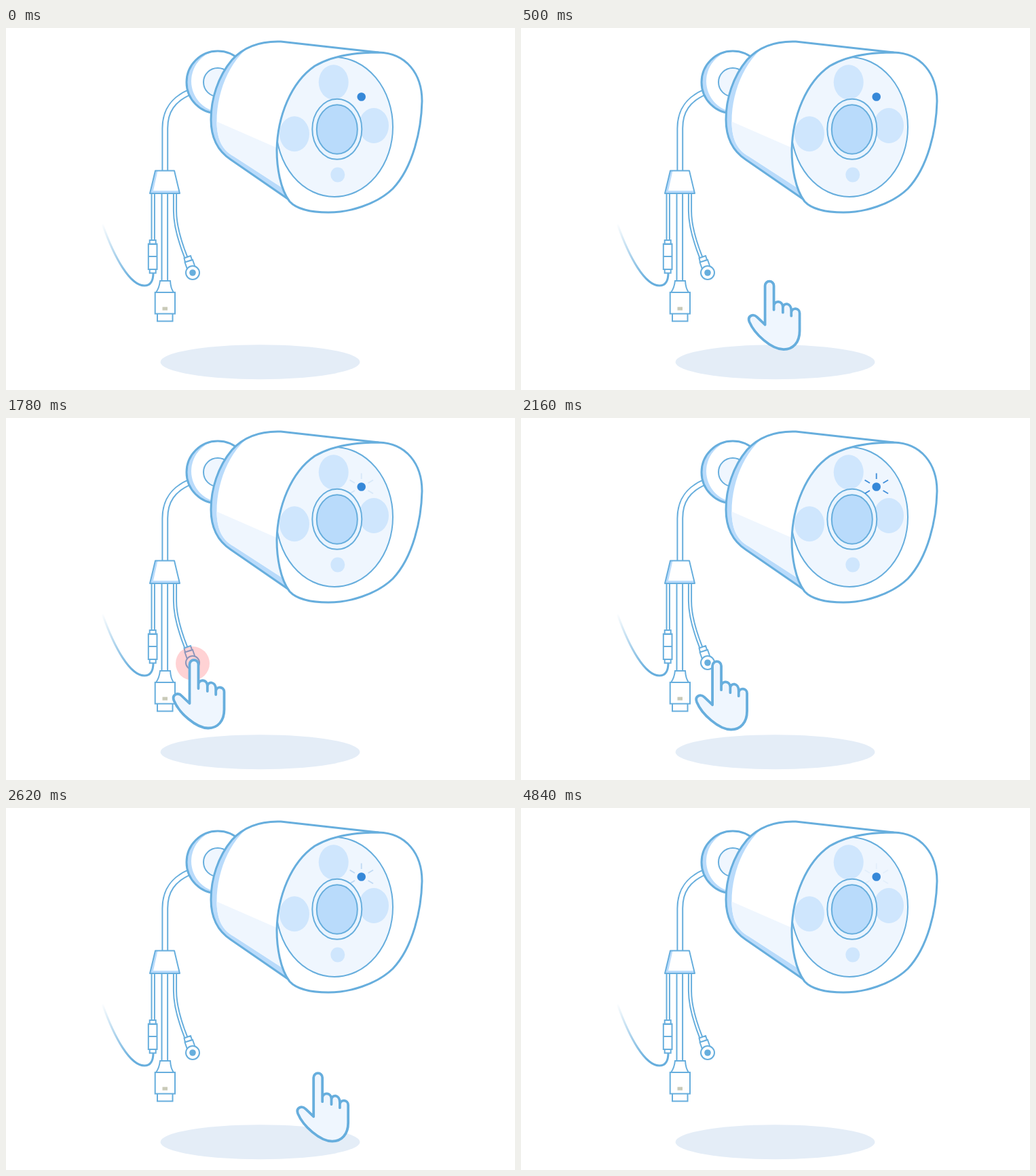
Write an HTML page that moves like this. It is 750 by 534 pixels and loops after 4900 ms.

```html
<!DOCTYPE html>
<html lang="en">
<head>
<meta charset="utf-8">
<title>Camera reset</title>
<style>
  html, body { margin: 0; width: 100%; height: 100%; overflow: hidden; background: #fff; }
  svg { display: block; width: 100%; height: 100%; }
  .line { stroke: #67aedd; stroke-width: 2; fill: #fff; }
  .bold { stroke-width: 3; }
  .none { fill: none; }
  .pale { fill: #eff6fe; }
  .soft { fill: #cfe6fd; }
  .deep { fill: #b9dbfb; }
  .core { stroke: #fff; fill: none; }
</style>
</head>
<body>
<svg viewBox="0 0 750 534">
  <defs>
    <path id="hood" d="M549 36C590 37 613 68 613 108C612 150 600 205 570 237C545 261 505 272 475 272C450 272 428 267 418 256C404 238 399 205 399 180C400 130 420 80 455 56C480 41 515 36 549 36Z"/>
    <path id="body" d="M549 36L405 20C375 19 350 28 333 47C312 72 302 105 302 135C302 160 310 180 331 194L418 254L480 150Z"/>
    <clipPath id="inHood"><use href="#hood"/></clipPath>
    <clipPath id="inBody"><use href="#body"/></clipPath>
    <clipPath id="inMount"><circle cx="312" cy="80" r="46"/></clipPath>
    <linearGradient id="fade" gradientUnits="userSpaceOnUse" x1="142" y1="288" x2="188" y2="372">
      <stop offset="0" stop-color="#67aedd" stop-opacity="0"/>
      <stop offset="1" stop-color="#67aedd"/>
    </linearGradient>
  </defs>

  <ellipse cx="374.5" cy="492.7" rx="147" ry="25.5" fill="#e4edf7"/>

  <!-- cables -->
  <g id="cables">
    <path d="M272 94C246 105 234.3 122 234.3 148V212" data-outer="9.8" data-inner="5.8"/>
    <path d="M216.7 244V314" data-outer="6.4" data-inner="2.4"/>
    <path d="M233.8 244V374" data-outer="10.6" data-inner="6.6"/>
    <path d="M249 244V270C249 292 256 315 265.500 339" data-outer="6.2" data-inner="2.2"/>
  </g>
  <path d="M142 289C160 340 183 380 204 380C213 380 217 374 217 361" fill="none" stroke="url(#fade)" stroke-width="3"/>

  <!-- cable splitter -->
  <path class="deep" d="M220 210.500H248L256 244H212Z"/>
  <path fill="#fff" d="M223.500 211H248L254.500 240H217Z"/>
  <path class="line none" stroke-linejoin="round" d="M220 210.500H248L256 244H212Z"/>

  <!-- plugs -->
  <g class="line">
    <path d="M211.700 313H220.700V319H211.700ZM211.700 356H220.700V361.500H211.700ZM209.800 318.500H222.500V356H209.800ZM209.800 337H222.500"/>
    <path d="M227 373H242C242.500 382 244 386 247 390H221C224 386 226 382 227 373Z"/>
    <path d="M219.700 390H249V421.500H219.700ZM223 421.500H245.500V432.500H223Z"/>
    <path d="M262.500 339.500L272 336L274 342L264 345.500ZM263.500 345.500L275 342L279.500 355L268 358.500Z"/>
    <circle cx="275" cy="361" r="10"/>
  </g>
  <rect x="230.500" y="411.500" width="7.500" height="5" fill="#c9cab8"/>
  <circle cx="275" cy="361" r="4.800" fill="#67aedd"/>

  <!-- mount -->
  <g clip-path="url(#inMount)">
    <circle class="deep" cx="312" cy="80" r="46"/>
    <circle fill="#fff" cx="319" cy="78.500" r="46"/>
  </g>
  <circle class="line bold none" cx="312" cy="80" r="46"/>
  <circle class="line pale" style="fill:#eff6fe" cx="312" cy="80" r="21"/>

  <!-- camera body -->
  <use href="#body" class="deep"/>
  <g clip-path="url(#inBody)">
    <path fill="#fff" d="M372 19C335 37 310.500 88 310.500 138C310.500 164 319 180 335 189L412 239L560 150V10Z"/>
    <path class="pale" d="M310.500 138L402 178L414 240L335 189C319 180 310.500 164 310.500 138Z"/>
  </g>
  <path class="line bold none" d="M549 36L405 20C375 19 350 28 333 47C312 72 302 105 302 135C302 160 310 180 331 194L418 254"/>

  <!-- camera face -->
  <use href="#hood" fill="#fff"/>
  <g clip-path="url(#inHood)">
    <ellipse class="line" style="fill:#eff6fe" cx="484" cy="146" rx="86" ry="103"/>
    <g class="soft">
      <ellipse cx="482.700" cy="80" rx="22" ry="25.700"/>
      <ellipse cx="542" cy="144" rx="22" ry="26"/>
      <ellipse cx="425" cy="156.300" rx="22" ry="26"/>
      <ellipse cx="488.800" cy="216.500" rx="10.500" ry="11"/>
    </g>
  </g>
  <ellipse class="line" style="fill:#eaf4fe" cx="487.800" cy="149.300" rx="36.500" ry="44.500"/>
  <ellipse class="line" style="fill:#b9dbfb" cx="487.800" cy="149.500" rx="30" ry="36.300"/>
  <use href="#hood" class="line bold" style="fill:none"/>

  <!-- status light -->
  <circle cx="523.700" cy="101.500" r="6.300" fill="#3688d8"/>
  <path id="rays" stroke="#3688d8" stroke-width="1.900" d="M523.700 81.500V90M506.500 91.500L514 96M541 91.500L533.500 96M506.500 111.500L514 107M541 111.500L533.500 107"/>

  <!-- press highlight and hand -->
  <circle id="press" cx="275" cy="362" r="25" fill="#ff4650" fill-opacity=".27"/>
  <g id="hand">
    <path fill="#eff6fe" stroke="#67aedd" stroke-width="3.800" stroke-linejoin="round" stroke-linecap="round"
      d="M360.500 438V380.500A6.500 6.500 0 0 1 373.500 380.500V416V410C374 402 386.500 402 386.800 412V420V413C387 405 399 405 399.200 417V425V420C400 412 411.500 413 411.500 421V447C411.500 464 402 474.500 388 474.500C370 474.500 345 452 337.500 434C334 425 343 421 349 427Z"/>
  </g>
</svg>
<script>
  const LOOP = 4900;
  const $ = id => document.getElementById(id);
  const ramp = (t, from, to) => Math.min(1, Math.max(0, (t - from) / (to - from)));

  // cubic-bezier(.42, 0, .58, 1), solved by bisection
  function ease(x) {
    let low = 0, high = 1;
    for (let i = 0; i < 20; i++) {
      const s = (low + high) / 2, r = 1 - s;
      if (3 * r * r * s * .42 + 3 * r * s * s * .58 + s ** 3 < x) low = s; else high = s;
    }
    return low * low * (3 - 2 * low);
  }

  // Each cable is a blue stroke with a narrower white one on top.
  for (const path of [...$('cables').children]) {
    const core = path.cloneNode();
    path.setAttribute('class', 'line none');
    path.style.strokeWidth = path.dataset.outer;
    core.setAttribute('class', 'core');
    core.style.strokeWidth = path.dataset.inner;
    path.after(core);
  }

  function rayOpacity(t) {
    if (t < 1780) return 0;
    const phase = (t - 1690) % 800;
    if (t > 1900 && (phase >= 750 || phase < 110)) return .06;
    return (1 - Math.cos(phase / 400 * Math.PI)) / 2;
  }

  function draw(t) {
    const away = 1 - ease(ramp(t, 120, 840)) + ease(ramp(t, 2038, 2762));
    $('hand').setAttribute('transform', `translate(${-90 + 198 * away} ${-17 + 37 * away})`);
    $('hand').style.opacity = ramp(t, 100, 300) - ramp(t, 2640, 2840);
    $('press').style.opacity = ramp(t, 680, 880) - ramp(t, 1760, 1960);
    $('rays').style.opacity = rayOpacity(t);
  }

  const start = performance.now();
  function tick() {
    draw((performance.now() - start) % LOOP);
    requestAnimationFrame(tick);
  }
  tick();
</script>
</body>
</html>
```
